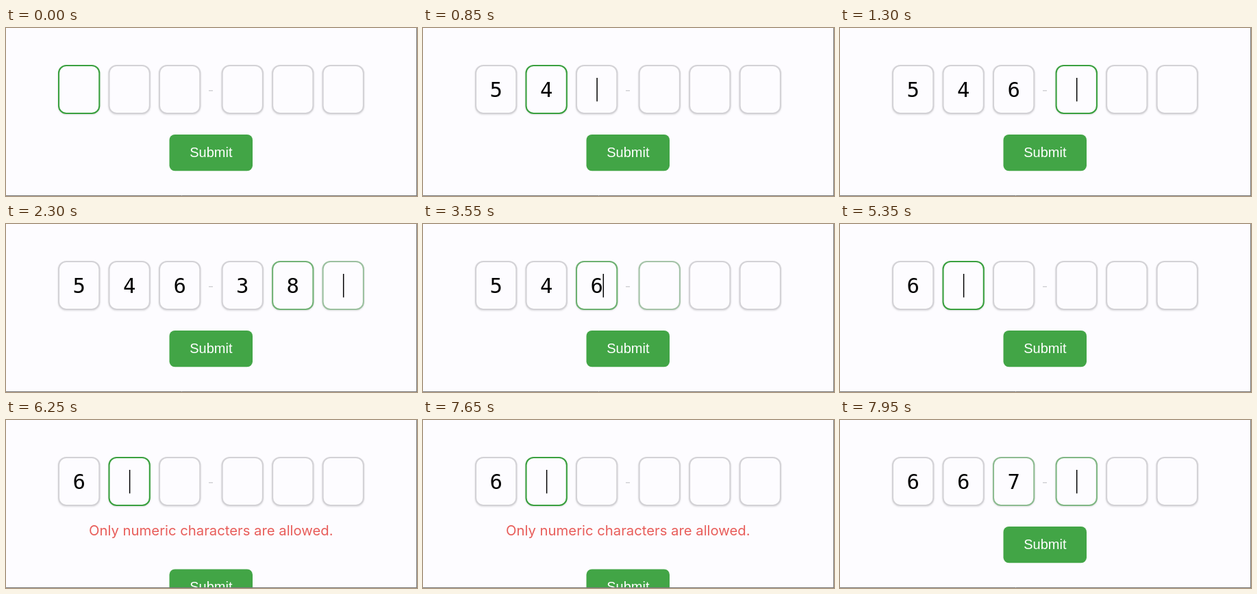
Animation of 600x246 px, one loop 8 s. Source, as an HTML page:

```html
<!DOCTYPE html>
<html lang="en">
<head>
<meta charset="utf-8">
<style>
  html, body { margin: 0; width: 100%; height: 100%; overflow: hidden; background: #fdfcff; }
  svg { display: block; }
  text { text-anchor: middle; }
  .box { fill: #fdfcff; stroke-width: 2.1; filter: drop-shadow(0 1px 1px rgba(0, 0, 0, .12)); }
  .digit { font: 30.6px "DejaVu Sans Mono", monospace; }
  .submit { font: 20px "Liberation Sans", Arial, sans-serif; fill: #fff; }
  .error { font: 20.3px Inter, sans-serif; fill: #e85d5a; }
</style>
</head>
<body>
<svg width="600" height="246" viewBox="0 0 600 246">
  <g id="boxes"></g>
  <rect x="296" y="91.3" width="6" height="1" fill="#bdbcc0"/>
  <rect id="caret" y="73" width="1.5" height="34.5"/>
  <text id="error" class="error" x="299.3" y="168.6">Only numeric characters are allowed.</text>
  <g id="button">
    <rect x="238.5" y="156" width="121.5" height="53.3" rx="8" fill="#42a546"/>
    <text class="submit" x="299.4" y="189">Submit</text>
  </g>
  <path d="M599.5 0V246M0 245.5H600" stroke="#777"/>
</svg>
<script>
const LOOP = 8000, BLINK = 510, FADE = 200;
const LEFT = [76, 149.5, 223, 314.6, 388.1, 461.6], WIDTH = 61.3;
const GREY = [211, 210, 214], GREEN = [58, 160, 63];

// Key presses: digits, '<' = backspace, 'x' = rejected letter, '' = caret restart
const KEYS = [
  [50, ''], [500, '5'], [850, '4'], [1080, '6'], [1700, '3'], [2255, '8'], [2490, '7'],
  ...Array.from({ length: 6 }, (_, i) => [3200 + i * 136, '<']),
  [5000, '6'], [6150, 'x'], [7700, '6'], [7888, '7']
];

const $ = id => document.getElementById(id);

function add(tag, attrs) {
  const node = document.createElementNS('http://www.w3.org/2000/svg', tag);
  for (const name in attrs) node.setAttribute(name, attrs[name]);
  return $('boxes').appendChild(node);
}

const cells = LEFT.map(x => ({
  box: add('rect', { class: 'box', x: x + 1, y: 55, width: WIDTH - 2, height: 70, rx: 11 }),
  digit: add('text', { class: 'digit', x: x + WIDTH / 2, y: 101 })
}));

// CSS "ease": cubic-bezier(.25, .1, .25, 1)
function ease(x) {
  const bezier = (a, b, u) => 3 * a * u * (1 - u) ** 2 + 3 * b * u * u * (1 - u) + u ** 3;
  let lo = 0, hi = 1;
  for (let i = 0; i < 20; i++) {
    const mid = (lo + hi) / 2;
    if (bezier(.25, .25, mid) < x) lo = mid; else hi = mid;
  }
  return bezier(.1, 1, lo);
}

const level = (f, t) => f.from + (f.to - f.from) * ease(Math.min(1, (t - f.start) / FADE));

function stateAt(t) {
  const values = Array(6).fill('');
  const fades = values.map((_, i) => ({ from: +!i, to: +!i, start: -FADE }));
  let focus = 0, error = false, pressed = -BLINK;

  const moveTo = (next, time) => {
    if (next === focus || next < 0 || next > 5) return;
    for (const i of [focus, next]) {
      fades[i] = { from: level(fades[i], time), to: +(i === next), start: time };
    }
    focus = next;
  };

  for (const [time, key] of KEYS) {
    if (time > t) break;
    pressed = time;
    if (key === 'x') error = true;
    else if (key === '<') {
      values[focus] = '';
      moveTo(focus - 1, time);
    } else if (key) {
      error = false;
      values[focus] = key;
      moveTo(focus + 1, time);
    }
  }
  const caretOn = Math.floor((t - pressed) / BLINK) % 2 === 0;
  return { values, levels: fades.map(f => level(f, t)), focus, error, caretOn };
}

function draw(t) {
  const s = stateAt(t);
  cells.forEach(({ box, digit }, i) => {
    const rgb = GREY.map((c, k) => Math.round(c + (GREEN[k] - c) * s.levels[i]));
    box.setAttribute('stroke', `rgb(${rgb})`);
    digit.textContent = s.values[i];
  });
  const afterDigit = s.values[s.focus] ? 9.2 : 0;
  $('caret').setAttribute('x', LEFT[s.focus] + WIDTH / 2 + afterDigit - .3);
  $('caret').setAttribute('visibility', s.caretOn ? 'visible' : 'hidden');
  $('error').setAttribute('visibility', s.error ? 'visible' : 'hidden');
  $('button').setAttribute('transform', `translate(0 ${s.error ? 62.4 : 0})`);
}

const begin = performance.now();
function tick() {
  draw((performance.now() - begin) % LOOP);
  requestAnimationFrame(tick);
}
tick();
</script>
</body>
</html>
```
